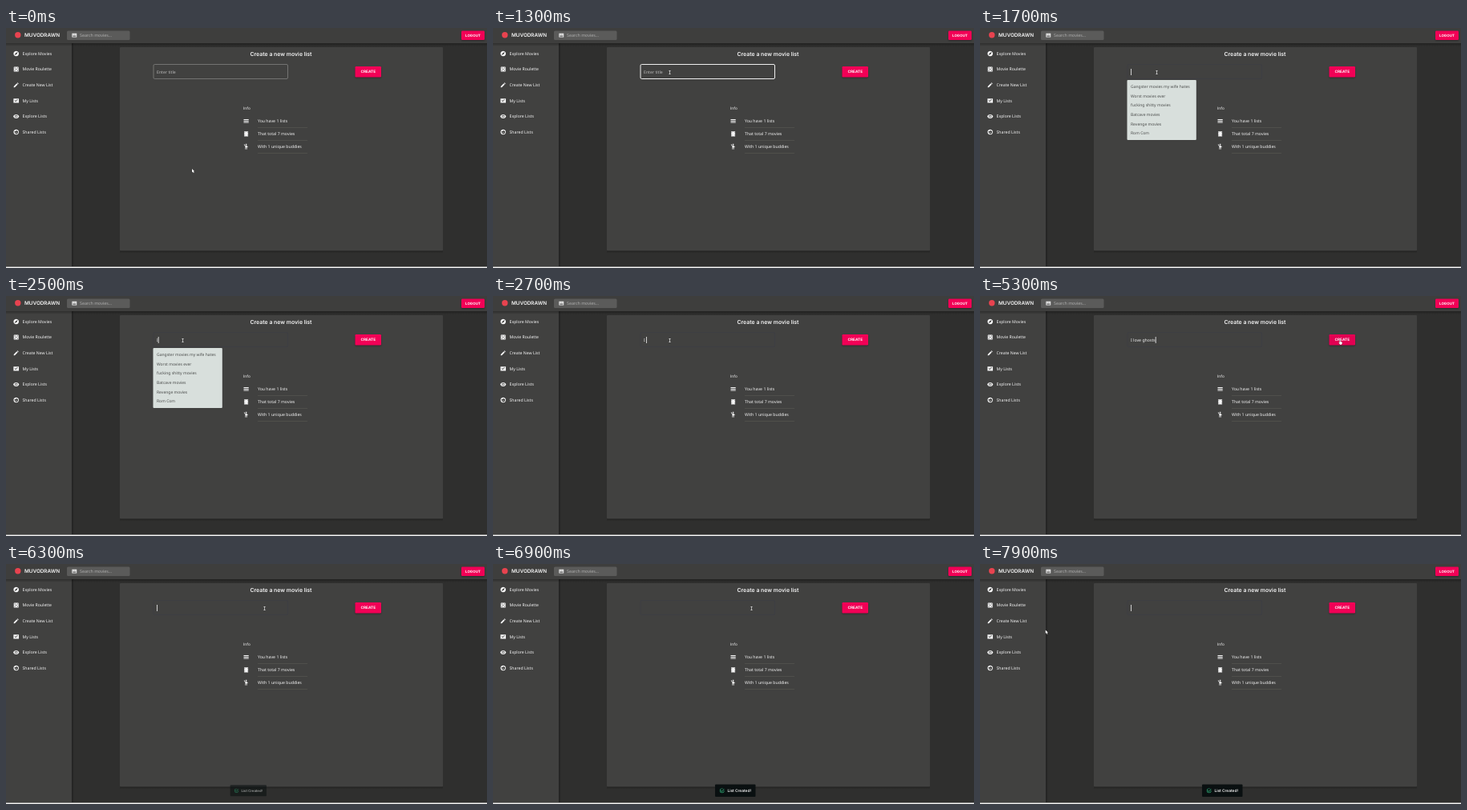
Recreate the animation shown at these times as an HTML page with a canvas. Size 600 by 300 pixels, loop 8000 ms.

```html
<!DOCTYPE html>
<html lang="en">
<head>
<meta charset="utf-8">
<title>Create a new movie list</title>
<style>
  html, body { margin: 0; width: 100%; height: 100%; overflow: hidden; background: #2f2f2e; }
  canvas { display: block; width: 600px; height: 300px; }
</style>
</head>
<body>
<canvas id="stage"></canvas>
<script>
const canvas = document.getElementById('stage');
const ctx = canvas.getContext('2d');
const ratio = window.devicePixelRatio || 1;
canvas.width = 600 * ratio;
canvas.height = 300 * ratio;

const LOOP = 8000;
const STEP = 100;
const PANEL = '#414140';
const PINK = '#f20056';
const BODY = '"Noto Sans", sans-serif';
const HEADING = 'Inter, sans-serif';
const FIELD = { x: 184, y: 45.5, w: 167.5, h: 18 };
const PHRASE = 'I love ghosts';

const SUGGESTIONS = ['Gangster movies my wife hates', 'Worst movies ever', 'fucking shitty movies',
  'Batcave movies', 'Revenge movies', 'Rom Com'];

// [time, characters shown]
const TYPING = [[0, 0], [2500, 1], [2700, 2], [2900, 4], [3000, 6], [3600, 8], [3700, 9],
  [3800, 10], [3900, 11], [4000, 13], [6300, 0]];

// [from, to] spans in which the caret is lit
const CARET = [[1500, 2000], [2500, 3400], [3600, 4600], [5300, 5800], [6300, 6900], [7400, LOOP]];

// [time, x, y]
const POINTER = [[0, 232, 176], [400, 232, 176], [500, 233, 142], [600, 231, 113], [700, 231, 113],
  [800, 225, 80], [900, 220.5, 59], [1000, 220.5, 59], [1300, 220.5, 55.5], [4700, 220.5, 55.5],
  [5100, 487, 59], [5200, 487, 59], [5300, 448.5, 55], [5400, 448.5, 55], [5600, 322.5, 55.5],
  [7200, 322.5, 55.5], [7900, 81.7, 82.5]];

// Icons on a 24 unit grid; dark details are cut with the even-odd rule or drawn on top.
const ICONS = {
  compass: 'M12 2a10 10 0 1 0 .01 0zM18 6l-4 8-8 4 4-8z',
  dice: 'M5 3h14a2 2 0 0 1 2 2v14a2 2 0 0 1-2 2H5a2 2 0 0 1-2-2V5a2 2 0 0 1 2-2z' +
    'M6 6h3v3H6zM15 6h3v3h-3zM10.5 10.5h3v3h-3zM6 15h3v3H6zM15 15h3v3h-3z',
  pencil: 'M3 17.2V21h3.8L17.8 10 14 6.2zM15.2 5L19 8.8l2.2-2.2L17.4 2.8z',
  card: 'M2 4h20v16H2zM6 11l4 5 8-8-1.5-1.5-6.5 6.5-2.5-3.5z',
  eye: 'M12 4.5C7 4.5 2.7 7.6 1 12c3.6 10 18.4 10 22 0-1.7-4.4-6-7.5-11-7.5zM12 7a5 5 0 1 1-.01 0zM12 9a3 3 0 1 0 .01 0z',
  face: 'M12 2a10 10 0 1 0 .01 0zM5 10q6 0 8-5 2 4 6 4 2 9-7 10.5-7-1-7-9.5zM8 12h2.5v2.5H8zM13.5 12H16v2.5h-2.5z',
  lines: 'M2 5h20v3H2zM2 10.5h20v3H2zM2 16h20v3H2z',
  film: 'M4 2h16v20H4zM5.5 5h2v2h-2zM5.5 11h2v2h-2zM5.5 17h2v2h-2zM16.5 5h2v2h-2zM16.5 11h2v2h-2zM16.5 17h2v2h-2z',
  person: 'M12 1a2.6 2.6 0 1 0 .01 0zM3 2h2.3q1 6 5 6h3q3 0 6 6l-2 1-2.3-3.5V23h-2.2v-6h-2v6H8.500V10Q4 8.500 3 2z',
  search: 'M2 4h20v16H2zM5 7v3h3V7zM10.5 7v3h3V7zM16 7v3h3V7zM5 13v4h14v-4z',
  check: 'M12 2a10 10 0 1 0 10 10h-2.500a7.500 7.500 0 1 1-5-7l2-2Q14 2 12 2zM7 10l-2 2 6 6L22 6l-2-2-9 10z'
};
for (const name in ICONS) ICONS[name] = new Path2D(ICONS[name]);

const ARROW = new Path2D('M0 0v4.500l1-.9 .8 1.700 .9-.4-.8-1.600h1.300z');
const HAND = new Path2D('M0 0q.6-.5 1 0v2l2.200.6v1.800l-.7 1.400H.6L-1 3.400l.4-.4L0 3.500z');

const MENU = [['compass', 'Explore Movies'], ['dice', 'Movie Roulette'], ['pencil', 'Create New List'],
  ['card', 'My Lists'], ['eye', 'Explore Lists'], ['face', 'Shared Lists']];
const INFO = [['lines', 'You have 1 lists'], ['film', 'That total 7 movies'], ['person', 'With 1 unique buddies']];

function rect(x, y, w, h, fill, radius = 0) {
  ctx.fillStyle = fill;
  ctx.beginPath();
  ctx.roundRect(x, y, w, h, radius);
  ctx.fill();
}

function text(string, x, middle, size, { color = '#f4f4f4', family = BODY, weight = 500, align = 'left' } = {}) {
  ctx.font = `${weight} ${size}px ${family}`;
  ctx.textAlign = align;
  ctx.fillStyle = color;
  ctx.fillText(string, x, middle + size * 0.36);
  return ctx.measureText(string).width;
}

function icon(name, x, y, size, color = '#f6f6f6') {
  ctx.save();
  ctx.translate(x - size / 2, y - size / 2);
  ctx.scale(size / 24, size / 24);
  ctx.fillStyle = color;
  ctx.fill(ICONS[name], 'evenodd');
  ctx.restore();
}

function button(label, x, y, w, h, size, fill = PINK) {
  ctx.save();
  ctx.shadowColor = 'rgba(0,0,0,.35)';
  ctx.shadowBlur = 2 * ratio;
  ctx.shadowOffsetY = ratio;
  rect(x, y, w, h, fill, 1.2);
  ctx.restore();
  text(label, x + w / 2, y + h / 2, size, { family: HEADING, weight: 700, align: 'center', color: '#fff' });
}

function shade(x, y, w, h, dx, dy) {
  const gradient = ctx.createLinearGradient(x, y, x + dx, y + dy);
  gradient.addColorStop(0, 'rgba(0,0,0,.3)');
  gradient.addColorStop(1, 'rgba(0,0,0,0)');
  rect(x, y, w, h, gradient);
}

function drawPage(overButton) {
  rect(0, 0, 600, 300, '#2f2f2e');
  rect(142, 24, 403, 254.5, PANEL, 1);
  shade(142, 278.5, 403, 3, 0, 3);
  rect(0, 19, 82, 279, PANEL);
  shade(82, 19, 3, 279, 3, 0);
  rect(0, 0, 600, 19, '#3e3e3d');
  shade(0, 19, 600, 4, 0, 4);
  rect(0, 298.5, 600, 1.5, '#f3f3f3');

  ctx.fillStyle = '#e8434f';
  ctx.beginPath();
  ctx.arc(14.8, 8.8, 3.7, 0, Math.PI * 2);
  ctx.fill();
  text('MUVODRAWN', 23, 9.2, 6.35, { family: HEADING, weight: 600 });
  rect(76, 3.5, 78.5, 11.5, '#5b5b5a', 1.5);
  icon('search', 85.3, 9.2, 7);
  text('Search movies...', 92, 9.2, 5.3, { color: '#b0b0af', weight: 400 });
  button('LOGOUT', 568, 3.5, 29, 11.5, 4.5);

  MENU.forEach(([name, label], i) => {
    const y = 32 + i * 19.6;
    icon(name, 12.7, y, 8);
    text(label, 20.5, y, 5.2);
  });

  text('Create a new movie list', 343, 32.6, 6.9, { family: HEADING, weight: 600, align: 'center' });
  button('CREATE', 435.5, 48, 32.5, 13.5, 4.7, overButton ? '#e30052' : PINK);
  text('Info', 296, 100.3, 4.8, { family: HEADING, color: '#dededd' });
  INFO.forEach(([name, label], i) => {
    const y = 116.3 + i * 16;
    icon(name, 299.6, y, 7.5);
    text(label, 314, y, 5.2);
    rect(314, y + 8, 62, 0.6, '#55544f');
  });
}

function drawField(t, hovered) {
  const focused = t >= 1500;
  ctx.strokeStyle = focused ? '#3d3e45' : hovered ? '#eeeeee' : '#80807f';
  ctx.lineWidth = hovered && !focused ? 1 : 0.8;
  ctx.beginPath();
  ctx.roundRect(FIELD.x, FIELD.y, FIELD.w, FIELD.h, 1.5);
  ctx.stroke();
  if (!focused) {
    text('Enter title', 188, 54.9, 5.2, { color: '#b9b9b8', weight: 400 });
    return;
  }
  const count = TYPING.findLast(([start]) => t >= start)[1];
  const width = text(PHRASE.slice(0, count), 188, 54.9, 5.2);
  if (CARET.some(([from, to]) => t >= from && t < to)) rect(188 + width, 51, 0.8, 8, '#f4f4f4');
}

function drawSuggestions(t) {
  if (t < 1500 || t >= 2700) return;
  ctx.save();
  ctx.globalAlpha = t >= 2600 ? 0.4 : 1;
  rect(183.5, 65, 86.3, 75, '#d8dfdc', 1);
  SUGGESTIONS.forEach((label, i) => text(label, 188, 73 + i * 11.7, 5.03, { color: '#4b4d4c' }));
  ctx.restore();
}

function drawToast(t) {
  const shown = Math.min(1, (t - 6200) / 400);
  if (shown <= 0) return;
  const eased = 1 - (1 - shown) ** 3;
  ctx.save();
  ctx.globalAlpha = eased;
  ctx.translate(302.5, 283.3);
  ctx.scale(0.75 + 0.25 * eased, 0.75 + 0.25 * eased);
  rect(-25.5, -7.8, 50.5, 15.500, '#0a1011', 1);
  icon('check', -16.8, 0, 7, '#2d9f6f');
  text('List Created!', -10, 0, 4.8, { family: HEADING, weight: 600 });
  ctx.restore();
}

function pointerAt(t) {
  const next = POINTER.findIndex(([time]) => time > t);
  if (next < 0) return POINTER.at(-1).slice(1);
  const [t0, x0, y0] = POINTER[next - 1];
  const [t1, x1, y1] = POINTER[next];
  const k = (t - t0) / (t1 - t0);
  return [x0 + (x1 - x0) * k, y0 + (y1 - y0) * k];
}

function drawPointer(x, y, inField, overButton) {
  if (inField) {
    rect(x - 0.35, y - 2.5, 0.7, 5, '#e4e4e4');
    rect(x - 1.2, y - 2.5, 2.4, 0.6, '#e4e4e4');
    rect(x - 1.2, y + 1.9, 2.4, 0.6, '#e4e4e4');
    return;
  }
  const shape = overButton ? HAND : ARROW;
  ctx.save();
  ctx.translate(x, y);
  ctx.lineWidth = 0.5;
  ctx.strokeStyle = '#222';
  ctx.stroke(shape);
  ctx.fillStyle = '#fff';
  ctx.fill(shape);
  ctx.restore();
}

function render(now) {
  const t = Math.floor((now % LOOP) / STEP) * STEP;
  const [x, y] = pointerAt(t);
  const inField = x > 184 && x < 352 && y > 45 && y < 64;
  const overButton = x > 435 && x < 468 && y > 48 && y < 62;
  ctx.setTransform(ratio, 0, 0, ratio, 0, 0);
  ctx.textRendering = 'geometricPrecision';
  drawPage(overButton);
  drawField(t, inField);
  drawSuggestions(t);
  drawToast(t);
  drawPointer(x, y, inField, overButton);
}

const start = performance.now();
function tick() {
  render(performance.now() - start);
  requestAnimationFrame(tick);
}
tick();
</script>
</body>
</html>
```
